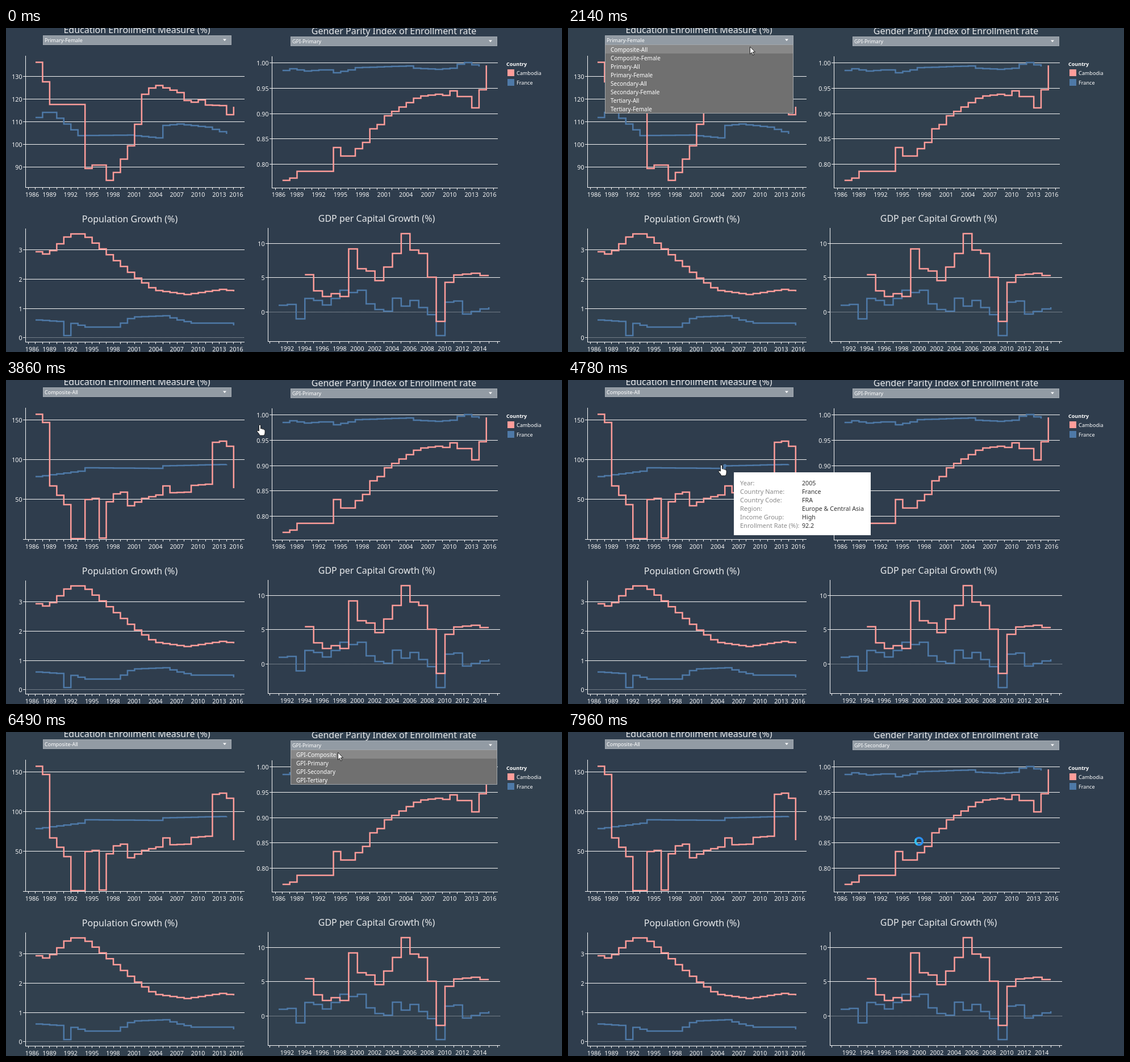
These frames come from a looping animation (979 by 572 pixels, 8000 ms). An HTML page with a canvas:

```html
<!DOCTYPE html>
<html lang="en">
<head>
<meta charset="utf-8">
<title>Country dashboard</title>
<style>
html, body { margin: 0; width: 100%; height: 100%; overflow: hidden; background: #2f3d4d; }
canvas { display: block; }
</style>
</head>
<body>
<canvas id="stage" width="979" height="572"></canvas>
<script>
const ctx = document.getElementById('stage').getContext('2d');
const PINK = '#ff9d9a', BLUE = '#4e79a7', WHITE = '#f4f4f4', LOOP = 8000;
const _ = null;
const lerp = (a, b, f) => a + (b - a) * f;

// One height per year; years marked _ lie on the straight line between their neighbours.
function series(start, ...keys) {
  const heights = keys.map((v, i) => {
    if (v !== _) return v;
    let a = i, b = i;
    while (keys[a] === _) a--;
    while (keys[b] === _) b++;
    return lerp(keys[a], keys[b], (i - a) / (b - a));
  });
  return { start, heights };
}

// grid: first value, value step, first y, y step, count
const left = { x: 34, right: 420, x0: 39.5, dx: 12.46, first: 1986, labels: 1986, every: 3, digits: 0 };
const enrolled = {
  ...left, top: 49, base: 281, label: 298, grid: [130, -10, 85, 40.1, 5],
  blue: series(1987, 158, 149, 149, _, _, _, 190, _, _, _, _, _, _, 189, _, _, _, 194, 172, _, 169.5, _, _, _, 175, _, _, 187),
  pink: series(1987, 60.5, 95, 135, _, _, _, 135, 248, 242, 242, 269, 255, _, 208, 170, 117, 106, 101.5, _, _, 114,
    128, 131, 127, 136, _, 137, 153, 139)
};
const composite = {
  ...enrolled, grid: [150, -50, 70, 70, 4],
  blue: series(1987, 170.5, _, _, _, _, _, 161, 155, _, _, _, _, _, _, _, _, _, 156, 151.5, _, _, _, _, _, _, _, _, 149),
  pink: series(1987, 60.5, 75, 187, _, 220, 280, 280, 211, 209, 279, 215, 201, 198, 222, _, 209, _, 203, 187,
    199, _, 198, 186, _, 184, 110, 108, 117, 191)
};
const others = [{
  x: 468, top: 50, base: 282, right: 866, x0: 474, dx: 12.82, first: 1986, labels: 1986, every: 3,
  label: 298, digits: 2, grid: [1, -.05, 61, 44.8, 5],
  blue: series(1987, 75, 72, _, 76, _, 74, 74, 79, _, 74, 70, _, _, _, _, _, _, 67, 71, _, _, 73, _, 71, 64, 61, 65, 68),
  pink: series(1987, 269, 265, 253, _, _, _, 253, 211, 226, 226, 213, 202, 178, 170.5, 155, _, _, _, 124, 120,
    _, 117, 119, 111, 121, 121, 141, 109, 66)
}, {
  ...left, top: 354, base: 554, label: 571, grid: [3, -1, 391, 51.8, 4],
  blue: series(1987, 515.5, _, _, 518, 543, 521.5, _, 528, _, _, _, 528, 521, 513, 510, _, _, _, 508, _, 515.5,
    _, 521, _, _, _, 521, 521, 525),
  pink: series(1987, 395, 399, 393, 381, 369, 363.5, 363.5, 369.5, _, _, _, _, _, _, 441.5, _, 458.5, 463.5,
    _, _, _, 470.5, _, _, _, _, 461.5, _, 465)
}, {
  x: 461, top: 353, base: 553, right: 870, x0: 464.6, dx: 15.42, first: 1990, labels: 1992, every: 2,
  label: 570, digits: 0, grid: [10, -5, 380, 60.4, 3],
  blue: series(1991, 489.5, 488, 513.5, 477.5, 481, 489, 477.5, 463, 467, 463, 487, 497, 500, 477, 491, 481,
    _, 506, 543, 484, 482, 505, _, 496, 493),
  pink: series(1994, 435.5, 464, 474, 469, 474, 390, 425, 429, 446, _, 398, 363, 392, 398, 440, 518, 449,
    436, _, 433, 437, 437)
}];

const measures = ['Composite', 'Primary', 'Secondary', 'Tertiary'];
const boxes = [{
  x: 65, y: 13, w: 332, open: 1590, follow: 1970, close: 2450, start: 3, pick: 0,
  items: measures.flatMap(m => [m + '-All', m + '-Female'])
}, {
  x: 501, y: 15, w: 364, open: 6250, follow: 6400, close: 7300, start: 1, pick: 2,
  items: measures.map(m => 'GPI-' + m)
}];

// start and end of each pointer move, where it goes, its shape from the start on
const moves = [
  [0, 0, 967, 57, ''],
  [130, 300, 970, 531, 'arrow'],
  [370, 610, 971, 298, ''],
  [610, 1440, 374, 22, 'arrow'],
  [1970, 2140, 320.5, 33, 'arrow'],
  [2500, 2680, 320, 43, 'ring'],
  [2790, 3090, 455, 72, 'ring'],
  [3630, 3860, 447, 79, 'hand'],
  [3930, 4330, 314, 150, 'hand'],
  [4580, 4780, 270, 150, 'hand'],
  [4850, 5090, 241, 153, 'hand'],
  [5490, 5550, 355, 137, 'hand'],
  [5620, 6080, 597, 23, 'arrow'],
  [6400, 6490, 584.5, 36, 'arrow'],
  [6570, 6810, 582, 41, 'arrow'],
  [6970, 7200, 578, 69, 'arrow'],
  [7350, 7740, 604, 128, 'ring'],
  [7740, 7960, 618, 193, 'ring']
];

const tips = [
  { from: 4330, to: 4660, x: 330, y: 166, year: 2008, rate: '92.1' },
  { from: 4660, to: 4960, x: 292, y: 163, year: 2005, rate: '92.2' },
  { from: 4960, to: 5490, x: 262, y: 166, year: 2002, rate: '88.7' },
  { from: 5490, to: 5620, x: 299, y: 161, year: 2006, rate: '92.2' }
];

const arrow = new Path2D('M0 0V13l3-2.8 2 4.8 2-.9-2-4.7h4z');
const hand = new Path2D('M-1.5 11V1.5a1.5 1.5 0 0 1 3 0V7q2.5-1 3 .8q2.2-.8 2.7 .9q1.9-.4 1.9 1.6V14q0 3-2 5H0q-1-3-5-7q-.5-2 1.5-1.6z');

function text(s, x, y, size, color = WHITE, align = 'left', weight = 400) {
  ctx.font = `${weight} ${size}px "Noto Sans", "Open Sans", sans-serif`;
  ctx.fillStyle = color;
  ctx.textAlign = align;
  ctx.fillText(s, x, y);
}

function rect(x, y, w, h, fill, border) {
  ctx.fillStyle = border || fill;
  ctx.fillRect(x, y, w, h);
  if (!border) return;
  ctx.fillStyle = fill;
  ctx.fillRect(x + 1, y + 1, w - 2, h - 2);
}

function steps(c, { start, heights }, color) {
  ctx.beginPath();
  heights.forEach((y, i) => {
    const x = c.x0 + (start - c.first + i) * c.dx;
    ctx.lineTo(x, heights[Math.max(0, i - 1)]);
    ctx.lineTo(x, y);
  });
  ctx.strokeStyle = color;
  ctx.lineWidth = 2.5;
  ctx.stroke();
}

function chart(c) {
  const [value, valueStep, gridTop, gap, count] = c.grid;
  for (let i = 0; i < count; i++) {
    const v = value + i * valueStep, y = Math.round(gridTop + i * gap);
    if (y > c.base - 4) {
      rect(c.x - 4, c.base, 4, 1, WHITE);
      continue;
    }
    if (v) rect(c.x, y, c.right - c.x, 1, WHITE);
    else for (let x = c.x; x < c.right; x += 2) rect(x, y, 1, 1, '#b4bac0');
    rect(c.x - 4, y, 4, 1, WHITE);
    text(v.toFixed(c.digits), c.x - 5.5, y + 4.5, 10.67, WHITE, 'right');
  }
  steps(c, c.blue, BLUE);
  steps(c, c.pink, PINK);
  rect(c.x, c.top, 1, c.base - c.top + 1, WHITE);
  rect(c.x, c.base, c.right - c.x, 1, WHITE);
  for (let year = c.first; year <= 2016; year++) {
    const x = c.x0 + (year - c.first) * c.dx;
    rect(Math.floor(x), c.base, 1, 4, WHITE);
    const n = year - c.labels;
    if (n < 0 || n % c.every || x > c.right - 6) continue;
    const mid = Math.min(Math.max(x - .5, c.x + 12), c.right - 14.5);
    text(year, mid, c.label, 10.67, WHITE, 'center');
  }
}

function dropdown(b, t, p) {
  const open = t >= b.open && t < b.close;
  const over = p.shape === 'arrow' && p.x > b.x && p.x < b.x + b.w && p.y > b.y && p.y < b.y + 17;
  rect(b.x, b.y, b.w, 17, over && !open ? '#9da5ad' : '#929ba4', '#a4abb2');
  text(b.items[t < b.close ? b.start : b.pick], b.x + 3, b.y + 12.3, 9, '#fff');
  const ax = b.x + b.w - 12, ay = b.y + 6.5;
  ctx.beginPath();
  ctx.moveTo(ax - 3, ay);
  ctx.lineTo(ax + 3, ay);
  ctx.lineTo(ax, ay + 3.5);
  ctx.fillStyle = '#fff';
  ctx.fill();
  if (!open) return;
  const top = b.y + 16, n = b.items.length;
  const hot = t < b.follow ? b.start : Math.min(n - 1, Math.max(0, Math.floor((p.y - top - 1) / 15)));
  rect(b.x, top, b.w, n * 15 + 2, '#707070', '#a2a6aa');
  rect(b.x + 1, top + 1 + hot * 15, b.w - 2, 15, '#888');
  b.items.forEach((s, i) => text(s, b.x + 10, top + 12.7 + i * 15, 10, '#fff'));
}

function tooltip(tip) {
  const { start, heights } = composite.blue;
  ctx.beginPath();
  ctx.arc(left.x0 + (tip.year - left.first) * left.dx, heights[tip.year - start], 3, 0, 7);
  ctx.fillStyle = BLUE;
  ctx.fill();
  rect(tip.x, tip.y, 241, 111, '#fff');
  const rows = [['Year', tip.year], ['Country Name', 'France'], ['Country Code', 'FRA'],
    ['Region', 'Europe & Central Asia'], ['Income Group', 'High'], ['Enrollment Rate (%)', tip.rate]];
  rows.forEach(([name, value], i) => {
    const y = tip.y + 22.5 + i * 15;
    text(name + ':', tip.x + 11, y, 11, '#8a8a8a');
    text(value, tip.x + 120, y, 10.7, '#333');
  });
}

function pointerAt(t) {
  const i = moves.findLastIndex(m => m[0] <= t);
  const [from, to, x, y, shape] = moves[i];
  const [, , px, py] = moves[Math.max(0, i - 1)];
  const rest = Math.max(0, to - t) / (to - from || 1);
  const f = 1 - rest ** 1.5;
  return { x: lerp(px, x, f), y: lerp(py, y, f), shape };
}

function pointer({ x, y, shape }) {
  if (!shape) return;
  ctx.save();
  ctx.translate(x, y);
  if (shape === 'ring') {
    ctx.lineWidth = 3.5;
    [['#2b8ff0', 0, 7], ['#35c3f3', 2, 3.9]].forEach(([color, from, to]) => {
      ctx.beginPath();
      ctx.arc(0, 0, 6.3, from, to);
      ctx.strokeStyle = color;
      ctx.stroke();
    });
  } else {
    const icon = shape === 'hand' ? hand : arrow;
    ctx.fillStyle = '#fff';
    ctx.strokeStyle = '#111';
    ctx.lineWidth = .9;
    ctx.fill(icon);
    ctx.stroke(icon);
  }
  ctx.restore();
}

function draw(t) {
  const p = pointerAt(t);
  const menu = boxes.some(b => t >= b.open && t < b.close);
  rect(0, 0, 979, 572, menu ? '#31404e' : '#2f3d4d');
  [t < 3320 ? enrolled : composite, ...others].forEach(chart);

  const title = (s, x, y) => text(s, x, y, 16, '#e9ebed', 'center');
  title('Education Enrollment Measure (%)', 230.5, 9);
  title('Gender Parity Index of Enrollment rate', 683, 10.5);
  title('Population Growth (%)', 218, 342.5);
  title('GDP per Capital Growth (%)', 652.5, 341.5);

  text('Country', 881, 67, 9, '#fff', 'left', 700);
  [['Cambodia', PINK], ['France', BLUE]].forEach(([name, color], i) => {
    rect(883, 73 + i * 17, 12, 12, color);
    text(name, 899, 83 + i * 17, 9.1, '#fff');
  });

  boxes.forEach(b => dropdown(b, t, p));
  const tip = tips.find(k => t >= k.from && t < k.to);
  if (tip) tooltip(tip);
  pointer(p);
}

const begin = performance.now();
function tick() {
  draw((performance.now() - begin) % LOOP);
  requestAnimationFrame(tick);
}
tick();
</script>
</body>
</html>
```
